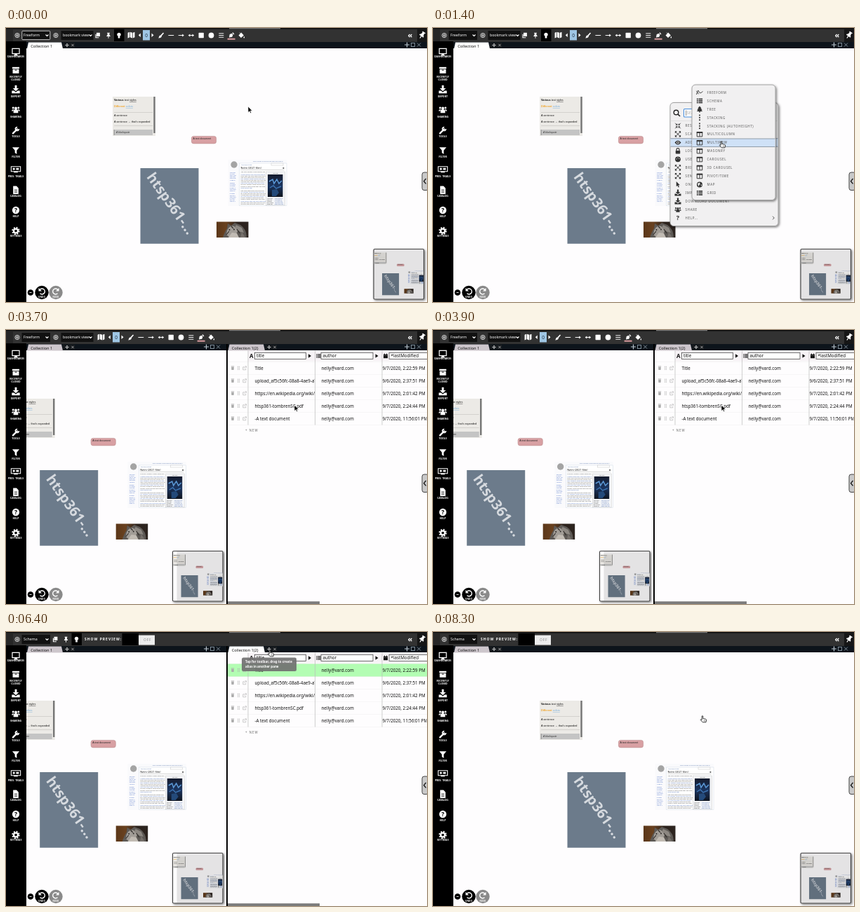
These frames come from a looping animation (600x391 px, 8400 ms). An HTML page:

```html
<!DOCTYPE html>
<html lang="en">
<head>
<meta charset="utf-8">
<title>Collection views</title>
<style>
html, body { margin: 0; width: 100%; height: 100%; overflow: hidden; background: #000; }
svg { display: block; font-family: "Noto Sans", "Open Sans", sans-serif; }
.arial { font-family: "Liberation Sans", Arial, sans-serif; }
</style>
</head>
<body>
<svg id="stage" width="600" height="391" viewBox="0 0 600 391"></svg>
<script>
const LOOP = 8400;
const rect = (x, y, w, h, fill, more = '') =>
  `<rect x="${x}" y="${y}" width="${w}" height="${h}" fill="${fill}" ${more}/>`;
const text = (x, y, size, fill, str, more = '') =>
  `<text x="${x}" y="${y}" font-size="${size}" fill="${fill}" ${more}>${str}</text>`;
const line = (d, color, w = 1, more = '') =>
  `<path d="${d}" fill="none" stroke="${color}" stroke-width="${w}" ${more}/>`;
const shape = (d, fill, more = '') => `<path d="${d}" fill="${fill}" ${more}/>`;
const dot = (x, y, r, fill, more = '') => `<circle cx="${x}" cy="${y}" r="${r}" fill="${fill}" ${more}/>`;
const at = (x, y, body, s = 1) => `<g transform="translate(${x} ${y}) scale(${s})">${body}</g>`;
const group = (id, body, more = '') => `<g id="${id}" ${more}>${body}</g>`;
const BOLD = 'font-weight="700"', MID = 'text-anchor="middle"';

// Icons are drawn around 0,0 in a box of about 10 units.
const icons = {
  monitor: c => line('M-5.3-4.5H5.3V3H-5.3z', c, 1.3) + shape('M-1.5 3h3l.5 2h1v1h-6v-1h1z', c),
  archive: c => shape('M-5.3-4.5H5.3v2.4H-5.3zM-4.7-1.3H4.7V5H-4.7z', c) + rect(-1.6, -.3, 3.2, 1, '#000'),
  download: c => shape('M-1.5-6h3v4.5h3L0 3-4.5-1.5h3zM-6 2h3.4L0 4.5 2.6 2H6v4H-6z', c),
  users: c => dot(0, -2, 2.1, c) + dot(-4, -2.6, 1.5, c) + dot(4, -2.6, 1.5, c) +
    shape('M-3.5 5V3a2.5 2.5 0 0 1 7 0v2zM-6.2 2.2q0-3 3.2-2.4l-1 2.4zM6.2 2.2q0-3-3.2-2.4l1 2.4z', c),
  wrench: c => line('M-4.3 4.3 2 -2', c, 2.4, 'stroke-linecap="round"') +
    line('M4.6-2.4A2.6 2.6 0 1 1 2.2-5', c, 1.8),
  funnel: c => shape('M-5.3-5H5.3L1.4-.3V5.2L-1.4 3.2V-.3z', c),
  trails: c => line('M-7-4.500H7V3H-7z', c, 1.1) + shape('M-4.500-2.300h3v2.800h-3zM.5-2.300h4v2.800h-4zM-3 3h6v1.600h-6z', c),
  file: c => shape('M-4-6H1L4-3V6H-4z', c) + line('M-2.2-.5h4.4M-2.2 1.5h4.4M-2.2 3.5h4.4', '#000', .7),
  help: c => dot(0, 0, 5.4, c) + text(0, 3.2, 9, '#000', '?', BOLD + ' ' + MID),
  gear: c => dot(0, 0, 3.1, 'none', `stroke="${c}" stroke-width="2.4"`) +
    dot(0, 0, 5, 'none', `stroke="${c}" stroke-width="2" stroke-dasharray="2 1.93"`),
  target: c => dot(0, 0, 4.2, 'none', `stroke="${c}" stroke-width="1"`) +
    dot(0, 0, 2, 'none', `stroke="${c}" stroke-width="1"`) + dot(0, 0, .8, c),
  copy: c => shape('M-2-5H4.5V2H-2z', c) + line('M-3.4-2.5V4.3H2.5', c, 1.5),
  pin: c => shape('M-2.5-5h5v1.2h-.9l.4 3L3.5 1v1H.6V5.5h-1.2V2h-2.9V1L-2-.8l.4-3h-.9z', c),
  bulb: c => dot(0, -1.5, 3.3, c) + shape('M-1.7 1.5h3.4V5h-3.4z', c),
  map: c => shape('M-5.5-3.5l3-1.2V3.7l-3 1.2zM-1.7-4.7l3.4 1.2V5L-1.7 3.7zM2.5-3.5l3-1.2V3.7l-3 1.2z', c),
  brush: c => line('M4.5-4.5 0 .5', c, 2) + shape('M-5 5q1-.7 1.3-2.8T0-.2Q2 1 .8 3T-5 5z', c),
  rule: c => line('M-5 0H5', c, 1.3),
  arrow: c => line('M-5 0H4', c, 1.3) + shape('M2-2.7 5.5 0 2 2.7z', c),
  both: c => line('M-4 0H4', c, 1.3) + shape('M2-2.7 5.5 0 2 2.7zM-2-2.7-5.5 0-2 2.7z', c),
  square: c => rect(-4.7, -4.7, 9.4, 9.4, c, 'rx=".8"'),
  circle: c => dot(0, 0, 5, c),
  lines: c => line('M-4.5-3.5h9M-4.5 0h9M-4.5 3.5h9', c, 1.2),
  pen: c => shape('M-4 4-3-2 1-3.5 3-1 1.5 3zM1.5-4.5 3-5.5 5.5-2.5 4.3-1.2z', c) + rect(-7, 5.4, 14, 2.6, '#d79a9e'),
  bucket: c => shape('M-5 0 0-5 4.5 0-.5 4.5zM5 1.5q2 3 0 3.5-2-.5 0-3.5z', c) + line('M-3-5 0-2', c, 1),
  move: c => line('M-4 0H4M0-4V4', c, 1.4) + shape('M0-6l2 2.5h-4zM0 6l2-2.5h-4zM-6 0l2.5-2v4zM6 0l-2.5-2v4z', c),
  cross: c => line('M-3.3-3.3 3.3 3.3M3.3-3.3-3.3 3.3', c, 1.6),
  compress: c => line('M-5-5l3.5 3.5M5-5 1.5-1.5M-5 5l3.5-3.5M5 5 1.5 1.5', c, 1.3) +
    shape('M-1-1h-3.5L-1-4.5zM1-1h3.5L1-4.5zM-1 1h-3.5L-1 4.5zM1 1h3.5L1 4.5z', c),
  expand: c => line('M-4-4 4 4M4-4-4 4', c, 1.3) +
    shape('M-5.5-5.5h4l-4 4zM5.5-5.5h-4l4 4zM-5.5 5.5h4l-4-4zM5.5 5.5h-4l4-4z', c),
  eye: c => shape('M-6 0Q0-8 6 0 0 8-6 0z', c) + dot(0, 0, 2.6, '#e6e9ee') + dot(0, 0, 1.5, c),
  lock: c => rect(-4.3, -.6, 8.6, 6, c, 'rx=".8"') + line('M-2.6 0v-2.3a2.6 2.6 0 0 1 5.2 0V0', c, 1.5),
  palette: c => dot(0, 0, 5.2, c) + dot(-2.5, -.5, .9, '#eee') + dot(0, -3, .9, '#eee') + dot(2.6, -1, .9, '#eee'),
  pointer: c => shape('M-3-5.5V4L-.8 2 1 5.8 2.6 5 .9 1.3H4z', c),
  ask: c => text(0, 4.5, 12, c, '?', BOLD + ' ' + MID),
  sign: c => line('M-6 4Q-3-7-2-3T1 1 6-2M-6-3l4 6', c, 1.2),
  list: c => [-4.5, -1.1, 2.3].map(y => rect(-5.5, y, 2.5, 2.2, c) + rect(-2, y, 7.5, 2.2, c)).join(''),
  tree: c => shape('M0-6l3.5 4H2l3 3.5H3L5.5 4H1v2h-2V4h-4.5L-3 1.5h-2L-2-2h-1.5z', c),
  dots: c => [-4.5, 0, 4.5].map(y => rect(-1.2, y - 1.2, 2.4, 2.4, c)).join(''),
  columns: c => line('M-5-4.2H5V4.3H-5zM0-4V4', c, 1.3) + rect(-5.6, -5, 11.2, 2.6, c),
  calendar: c => shape('M-5-3.800h1.500V-6H-2v2.200H2V-6h1.500v2.200H5v2H-5zM-5-1.200H5V5.500H-5z', c),
  globe: c => dot(0, 0, 5.3, c) + shape('M-4-2 0-4 1-1-1 1-2 4zM2 0l2.5 0L3 3z', '#eee'),
  trash: c => shape('M-4-5h8v1.4h-8zM-3.4-3h6.8L2.9 5h-5.8z', c),
  grip: c => [-3.6, 0, 3.6].map(y => rect(-2.5, y - 1, 1.7, 2, c) + rect(.8, y - 1, 1.7, 2, c)).join(''),
  link: c => line('M0-3h-4.5v8h8V1M-1 1 4.5-4.5M1-5h4v4', c, 1.2)
};
const icon = (name, x, y, s, c = '#fff') => at(x, y, icons[name](c), s);
const chevron = (x, y) => line(`M${x - 2} ${y - 1}l2 2 2-2`, '#fff', 1.1);

const filler = 'The story follows a small group over one long night and the choice that they make at dawn';
const lorem = (x, y, n, color = '#444', k = 0) => text(x, y, 2.1, color, filler.substr(k % 40, n));

function note() {
  return rect(152, 98, 61, 56, '#eceae6') + rect(210.3, 98, 2.4, 52, '#777') +
    `<g class="arial">` +
    text(154, 104, 3.8, '#111', '<tspan font-weight="700">Various</tspan> text <tspan text-decoration="underline">styles</tspan>') +
    text(154, 113.2, 3.8, '#f0a52a', '<tspan font-weight="700">Different</tspan> <tspan fill="#6fa9d8" text-decoration="underline">colors</tspan>') +
    text(154, 126, 3.8, '#111', 'A sentence') +
    text(154, 134.8, 3.8, '#111', 'A sentence → that\'s expanded') +
    rect(154, 145, 55, 8, '#c4c4c4') + rect(153.6, 145, 1, 8, '#888') +
    text(157, 150.3, 3.4, '#333', 'A blockquote', 'font-style="italic"') + '</g>' +
    line('M154 120.5h55M154 139.5h55', '#c9c7c3', .7);
}
function article() {
  let s = rect(316.5, 188, 83.5, 66, '#fafafc') + rect(332.5, 193, 67.5, 60.5, '#fff', 'stroke="#c5d3e2" stroke-width=".4"') +
    dot(325, 195, 4.7, '#a4a4a4') + lorem(352, 191, 44, '#5877ad', 4) + lorem(335, 195.5, 16, '#5877ad') +
    rect(378, 193, 17, 3, '#fff', 'stroke="#bbb" stroke-width=".4"') +
    text(334.5, 201.2, 3.8, '#222', 'Nelm (2021 film)') + line('M334.5 202.5h62', '#999', .4) + rect(394.5, 199, 1.8, 1.8, '#555');
  for (let i = 0; i < 21; i++)
    if (i % 7 !== 6) s += lorem(319, 206.5 + i * 2.2, 8 + i * 5 % 5, '#3c62c0', i * 7);
  for (let i = 0; i < 23; i++)
    if (i !== 1 && i !== 12) s += lorem(334.5, 205.5 + i * 2.1, i === 11 ? 18 : 35, i % 3 === 2 ? '#3c5fae' : '#444', i * 9);
  s += rect(370.5, 205, 27, 48, '#f5f6f8', 'stroke="#bbb" stroke-width=".4"') + lorem(380, 208, 8, '#333') +
    rect(373, 209, 21.5, 32, 'url(#poster)') +
    line('M375 219l5-3 2 6 4-6 3 6 4-4', '#5b98d6', 1.5) + line('M376 228l5-3 4 4 7-3', '#3d74b2', 1.4) +
    shape('M379 231l7-1 3 5-4 5h-6z', '#244a7a');
  for (let i = 0; i < 5; i++) s += lorem(372, 243.5 + i * 2.1, 8, '#333', i * 5) + lorem(383, 243.5 + i * 2.1, 12, '#3c5fae', i * 8);
  return s;
}
function photo() {
  return rect(300, 276.5, 45.5, 22.5, 'url(#wood)') +
    '<g clip-path="url(#photoBox)">' + shape('M309 299q3-9 6-13l1-7 5 3 5-4 8 3q9 6 9 18z', '#5d5955') +
    shape('M315 289q4-8 10-6l6 5-4 8-8 3-5-4z', '#a29d97') + shape('M328 281l8 4 3 7-5-1-8-6z', '#8c8781') +
    shape('M317 299l5-7 7 1 3 6z', '#c1bbb3') + shape('M334 299l2-8 5 8z', '#77716c') +
    line('M321 283l3 3M329 287l4 6M314 295l4-5', '#2f2b28', 1.2) +
    dot(318.5, 288, 1, '#2a2725') + dot(325, 287.5, 1, '#2a2725') + '</g>';
}
function scene() {
  return note() +
    rect(264.4, 154.4, 35.2, 10.5, '#d8a0a3', 'rx="3" stroke="#bb8b8e" stroke-width=".6"') +
    text(266.5, 159.3, 3.6, '#222', 'A text document', 'class="arial"') +
    rect(191.5, 200, 83, 107.8, '#6c7b8b') +
    `<g transform="translate(199.8 212.6) rotate(54.8)">${text(0, 0, 20, '#d6dadf', 'htsp361-...', BOLD)}</g>` +
    article() + photo();
}

function sidebar() {
  const items = [['monitor', 33.7, 'DASHBOARDS'], ['archive', 60, 'RECENTLY', 'CLOSED'], ['download', 87.5, 'IMPORT'],
    ['users', 116.5, 'SHARING'], ['wrench', 146.3, 'TOOLS'], ['funnel', 175, 'FILTER'], ['trails', 202, 'PRES. TRAILS'],
    ['file', 231.3, 'CATALOG'], ['help', 260, 'HELP'], ['gear', 289.5, 'SETTINGS']];
  const label = (y, s) => text(14, y, 3.5, '#fff', s, MID + ' font-weight="600"');
  return rect(0, 19, 29, 372, '#000') + items.map(([name, y, a, b], i) => {
    const base = 42.4 + i * 28.42;
    return icon(name, 14, y, .95) + label(base, a) + (b ? label(base + 4.6, b) : '');
  }).join('');
}
function drawTools() {
  const names = ['brush', 'rule', 'arrow', 'both', 'square', 'circle', 'lines', 'pen', 'bucket'];
  return icon('map', 178.5, 10, .9) + shape('M191.8 7.5v5.4l-3-2.7z', '#fff') +
    rect(195, 3, 10, 14.5, '#9fc6e4') + text(200, 12.5, 6.5, '#234', '0', MID) +
    shape('M207.5 7.5v5.4l3-2.7z', '#fff') +
    names.map((n, i) => icon(n, 221 + i * 14.3, 10.5, .78)).join('');
}
const docTools = x => icon('copy', x, 10.5, .75) + icon('pin', x + 15.5, 10.5, .75) +
  rect(x + 23.5, 1.5, 14.5, 17.5, '#000') + icon('bulb', x + 30.5, 10.5, .8);
function toolbar() {
  return rect(0, 0, 600, 20, '#323232') + rect(0, 0, 600, 1.5, '#0a0a0a') + rect(318, 0, 73, 1.3, '#777') +
    rect(0, 1.5, 10, 18, '#262626') + icon('target', 16, 10.5, .75) + rect(22.5, 4, 40.5, 13, '#111') +
    chevron(58.5, 10.5) +
    group('selectRing', rect(22.8, 4.2, 40, 12.4, 'none', 'rx="1" stroke="#ddd" stroke-width=".9"')) +
    group('freeBar', text(25, 12.3, 5.3, '#fff', 'Freeform') + icon('target', 71, 10.5, .75) +
      rect(78.5, 4, 46, 13, '#111') + text(81, 12.3, 5.2, '#fff', 'bookmark view') + chevron(120.5, 10.5) +
      group('docTools', docTools(130.5)) + group('drawTools', drawTools())) +
    group('schemaBar', text(25, 12.3, 5.3, '#fff', 'Schema') + group('schemaDoc', docTools(70)) +
      group('preview', text(112, 12.2, 5, '#fff', 'SHOW PREVIEW:', BOLD + ' letter-spacing="1"') +
        rect(165.5, 2, 23.5, 17, '#000') + rect(189, 4.6, 23, 13.9, '#ececec') +
        text(196, 13.4, 5, '#888', 'OFF', 'letter-spacing=".7"'))) +
    rect(586, 1.5, 14, 18.5, '#161616') + text(576, 14, 11, '#fff', '«', MID + ' ' + BOLD) +
    `<g transform="translate(593 10) rotate(35)">${icons.pin('#fff')}</g>`;
}
const windowKeys = x => line(`M${x} 20.5v7M${x - 3.5} 24h7`, '#b9c3cc', 1.2) +
  rect(x + 6, 21.5, 5, 5, 'none', 'stroke="#8795a1" stroke-width=".9"') +
  line(`M${x + 14.5} 21.5l5 5m0-5l-5 5`, '#8795a1', .9);
const tab = (x, w, name, id) => shape(`M${x} 29.5l2-9h${w - 4}l2 9z`, '#cdc6cc', `id="${id}"`) +
  text(x + 5.2, 27.6, 5.7, '#111', name) +
  rect(x + w, 20.5, 17, 8.5, '#15191d') + icon('move', x + w + 6, 24.5, .45) + icon('cross', x + w + 14, 24.5, .5, '#bbb');

function schema() {
  const rows = [['Title', '9/7/2020, 2:22:59 PM'], ['upload_af5c56fc-08a8-4ae9-a7d1', '9/6/2020, 2:37:51 PM'],
    ['https://en.wikipedia.org/wiki/', '9/7/2020, 2:01:42 PM'], ['htsp361-tombrenSC.pdf', '9/7/2020, 2:24:44 PM'],
    ['-A text document', '9/7/2020, 11:56:01 PM']];
  const field = (x, w, name) => rect(x, 32.3, w, 9.2, '#fff', 'stroke="#333" stroke-width=".7"') +
    text(x + 2.5, 39.2, 6.2, '#111', name);
  let s = rect(316, 29, 284, 362, '#fefdfe') + rect(345, 29.5, 255, 15, '#f7f3f6') +
    group('picked', rect(316, 45.5, 284, 18, '#b3fdb3'));
  s += text(349.8, 40, 8, '#111', 'A', MID + ' ' + BOLD) + field(354.5, 73, 'title') + shape('M431 34.2v5.6l4-2.8z', '#111') +
    icon('list', 445.5, 37, .6, '#333') + field(449, 74, 'author') + shape('M526.5 34.2v5.6l4-2.8z', '#111') +
    icon('calendar', 541, 37, .6, '#111') + field(546, 58, '*lastModified');
  rows.forEach(([name, date], i) => {
    const y = 54.3 + i * 18;
    s += icon('trash', 323, y, .55, '#aaa') + icon('grip', 331.5, y, .55, '#aaa') + icon('link', 340, y, .5, '#aaa') +
      `<g clip-path="url(#nameCol)">${text(354.5, y + 2.3, 6.2, '#111', name)}</g>` +
      text(449.5, y + 2.3, 6.2, '#111', 'nelly@vard.com') + text(536.5, y + 2.3, 6.2, '#111', date);
  });
  for (let i = 0; i < 6; i++) s += line(`M316 ${45.5 + i * 18}h284`, '#000', .6, 'opacity=".05"');
  return s + line('M345 29.5v106M440.5 29.5v106M536 29.5v106', '#bbb', .7) +
    text(341, 145.3, 4.4, '#666', '+ NEW', 'letter-spacing="1"') + rect(316, 387.3, 131, 3.7, '#7b7b7b') +
    rect(314, 20, 2, 371, '#000');
}

const ROOT = ['RESET VIEW', 'SCALE TO FIT', 'ADD A PERSPECTIVE...', 'LOCK POSITION', 'USE CUSTOM LAYOUT', 'BRING TO FRONT',
  'SEND TO BACK', 'ONCLICK...', 'IMPORT DOCUMENT', 'DOWNLOAD DOCUMENT', 'SHARE', 'HELP...'];
const ROOT_ICONS = ['compress', 'expand', 'eye', 'lock', 'palette', 'expand', 'expand', 'pointer', 'download', 'download', 'users', 'ask'];
const VIEWS = ['FREEFORM', 'SCHEMA', 'TREE', 'STACKING', 'STACKING (AUTOHEIGHT)', 'MULTICOLUMN', 'MULTIROW', 'MASONRY',
  'CAROUSEL', '3D CAROUSEL', 'PIVOT/TIME', 'MAP', 'GRID'];
const VIEW_ICONS = ['sign', 'list', 'tree', 'dots', 'dots', 'columns', 'columns', 'columns', 'columns', 'columns', 'columns', 'globe', 'list'];
const STEP = 11.95;
const panel = (x, y, w, h) => rect(x, y, w, h, '#f1f0f1', 'rx="5" stroke="#9a9a9a" stroke-width=".9" filter="url(#shade)"');
const bar = (id, x, w) => `<g id="${id}">${rect(x, -5.7, w, 11.5, '#cfe1f7')}${line(`M${x} -5.7h${w}M${x} 5.8h${w}`, '#6f7b8a', .7)}</g>`;
const entries = (x, y, names, pics) => names.map((n, i) => icon(pics[i], x, y + i * STEP, .75, '#333') +
  text(x + 10.6, y + i * STEP + 1.7, 4.5, '#555', n, 'letter-spacing=".62"')).join('');
function menus() {
  const more = y => line(`M484 ${y - 2.3}l2.3 2.3-2.3 2.3`, '#444', .9);
  return group('menu', panel(338, 106.5, 154, 176) + dot(346.5, 120.5, 3.3, 'none', 'stroke="#222" stroke-width="1.4"') +
      line('M349 123l3 3', '#222', 1.7) + rect(357.5, 115.5, 130, 11.5, '#fff', 'rx="1" stroke="#4b8fdc" stroke-width="1.1"') +
      line('M360.7 117.5v7.5', '#333', .6) + text(362, 123.3, 4.6, '#999', 'SEARCH MENU...', 'letter-spacing=".6"') +
      line('M338 132.5h154', '#d5d5d5', .6) + bar('rootBar', 338.5, 153) + entries(349, 139.5, ROOT, ROOT_ICONS) +
      more(163.5) + more(271)) +
    group('views', panel(369, 81, 119, 164.5) + bar('viewBar', 369.5, 118) + entries(380, 92, VIEWS, VIEW_ICONS));
}
const cursors = {
  arrow: shape('M0 0v8.5l2-1.8 1.3 2.9 1.3-.6-1.3-2.8h2.6z', '#000', 'stroke="#fff" stroke-width=".6"'),
  hand: shape('M-.8 0Q0-.8.8 0V3.5l4 .8q1 .4.8 1.6L5 8.8H.3L-2.8 5.3q0-1.3 2 0z', '#fff', 'stroke="#111" stroke-width=".8"') +
    line('M2.2 5.7v1.8M3.7 5.7v1.8', '#111', .5),
  grab: shape('M-2 8.5-4 4.5q.3-1.2 1.7.3V.8q.7-.9 1.3 0V-.3q.7-.8 1.4 0V.7q.8-.8 1.4 0V2q.8-.8 1.3 0V5.5L2.2 8.5z', '#fff', 'stroke="#111" stroke-width=".6"')
};
const clip = (id, x, y, w, h) => `<clipPath id="${id}">${rect(x, y, w, h, '#000', `id="${id}Rect"`)}</clipPath>`;

const stage = document.getElementById('stage');
stage.innerHTML = `<defs>
  <filter id="shade" x="-10%" y="-10%" width="125%" height="125%"><feDropShadow dx="1.5" dy="1.5" stdDeviation="1.5" flood-opacity=".5"/></filter>
  <linearGradient id="poster" x2="0" y2="1"><stop stop-color="#141a2c"/><stop offset=".5" stop-color="#1b3560"/><stop offset="1" stop-color="#10151f"/></linearGradient>
  <linearGradient id="wood"><stop stop-color="#5b3719"/><stop offset=".3" stop-color="#69411f"/><stop offset=".65" stop-color="#2b211b"/><stop offset="1" stop-color="#2d2520"/></linearGradient>
  ${clip('photoBox', 300, 276.5, 45.5, 22.5)}${clip('pane', 29, 29, 571, 362)}
  ${clip('mapBox', 524.5, 316, 70.5, 70.5)}${clip('nameCol', 345, 30, 95, 110)}</defs>` +
  rect(0, 0, 600, 391, '#000') + rect(29, 20, 571, 9, '#0d141b') + rect(29, 29, 571, 362, '#fefdfe') +
  `<g clip-path="url(#pane)">${group('scene', group('sceneBody', scene()))}</g>` +
  group('minimap', rect(524, 315.5, 71.5, 71.5, '#fefdfe', 'rx="1.5" stroke="#444" stroke-width="1.2" filter="url(#shade)"') +
    `<g clip-path="url(#mapBox)"><use href="#sceneBody" transform="translate(480.5 292) scale(.29)"/>` +
    rect(489, 300, 165, 105, '#000', 'id="viewport" opacity=".1"') + '</g>') +
  dot(35, 377.5, 4.3, '#000') + line('M33.5 377.5h3', '#fff', .9) +
  [[51, '#000', 'UNDO', 1], [71, '#8a8a8a', 'REDO', -1]].map(([x, c, name, dir]) => dot(x, 377.5, 9.7, c) +
    `<g transform="translate(${x} 376) scale(${dir} 1)">${line('M-3-2.3A4 4 0 1 1-2.5 2.8', '#fff', 1.4)}${shape('M-4.5-5v4.5H0z', '#fff')}</g>` +
    text(x, 385.3, 3.2, '#fff', name, MID + ' font-weight="600"')).join('') +
  tab(30, 51, 'Collection 1', 'tabA') + group('keysA', windowKeys(571.5)) +
  group('split', schema() + rect(316, 20, 284, 9, '#0d141b') + tab(316.5, 52.5, 'Collection 1(2)', 'tabB') + windowKeys(571.5)) +
  toolbar() + sidebar() +
  rect(593, 206, 9, 25.5, '#c9c9c9', 'rx="3" stroke="#444" stroke-width="1"') + line('M598.5 215l-3 3.7 3 3.7', '#111', 1.3) +
  group('tip', rect(336, 36.5, 78, 19.5, '#717171', 'rx="2.5" opacity=".92"') +
    text(341, 44.3, 4.5, '#fff', 'Tap for toolbar, drag to create', BOLD) + text(341, 51.3, 4.5, '#fff', 'alias in another pane', BOLD)) +
  menus() + group('cursor', Object.entries(cursors).map(([k, v]) => group(k, v)).join(''));

const $ = id => document.getElementById(id);
const show = (id, on) => $(id).setAttribute('display', on ? 'inline' : 'none');
const move = (id, x, y) => $(id).setAttribute('transform', `translate(${x} ${y})`);

const track = [[0, 345, 112], [600, 345, 112], [1000, 361, 162], [1400, 411, 162], [1900, 411, 204], [2300, 411, 140],
  [2600, 411, 110.5], [3600, 411, 110.5], [3700, 411, 107], [3900, 411, 107], [4300, 386, 53], [5200, 384, 54],
  [5800, 376, 26], [7200, 376, 26], [7400, 383, 21], [7700, 383, 21], [8200, 393, 95], [8300, 384, 120], [LOOP, 384, 120]];
function pointerAt(t) {
  let i = 0;
  while (i < track.length - 2 && t >= track[i + 1][0]) i++;
  const [a, x0, y0] = track[i], [b, x1, y1] = track[i + 1];
  const p = (t - a) / (b - a), e = p * p * (3 - 2 * p);
  return [x0 + (x1 - x0) * e, y0 + (y1 - y0) * e];
}
function draw(ms) {
  const t = Math.floor(ms % LOOP / 100) * 100;
  const [x, y] = pointerAt(t);
  const split = t >= 3700 && t < 7700, schemaOn = t >= 4400;
  const menu = t >= 200 && t < 3700, views = t >= 1000 && t < 3700;

  $('paneRect').setAttribute('width', split ? 285 : 571);
  move('scene', split ? -143.3 : 0, 0);
  move('minimap', split ? -286.5 : 0, 0);
  move('viewport', split ? 41 : 0, 0);
  show('split', split);
  move('keysA', split ? -286 : 0, 0);
  $('tabA').setAttribute('fill', t < 3700 ? '#fff' : '#cdc6cc');
  $('tabB').setAttribute('fill', t >= 5700 ? '#fff' : '#cdc6cc');
  show('picked', schemaOn);
  show('tip', t >= 6100 && t < 7300);

  show('selectRing', t < 100);
  show('freeBar', !schemaOn);
  show('docTools', !split);
  move('drawTools', split ? -43 : 0, 0);
  show('schemaBar', schemaOn);
  show('schemaDoc', split);
  move('preview', split ? 0 : -44, 0);

  show('menu', menu);
  show('views', views);
  const row = views ? 2 : Math.round((y - 139.5) / STEP);
  show('rootBar', row >= 0);
  move('rootBar', 0, 139.5 + row * STEP);
  const view = Math.round((y - 92) / STEP);
  show('viewBar', x > 369);
  move('viewBar', 0, 92 + view * STEP);

  const kind = t >= 7300 && t < 7700 ? 'grab'
    : (t >= 700 && t < 3700) || (t >= 5700 && t < 7300) || t >= 7700 ? 'hand' : 'arrow';
  for (const k in cursors) show(k, k === kind);
  move('cursor', x, y);
}
const start = performance.now();
function tick() {
  draw(performance.now() - start);
  requestAnimationFrame(tick);
}
draw(0);
requestAnimationFrame(tick);
</script>
</body>
</html>
```
